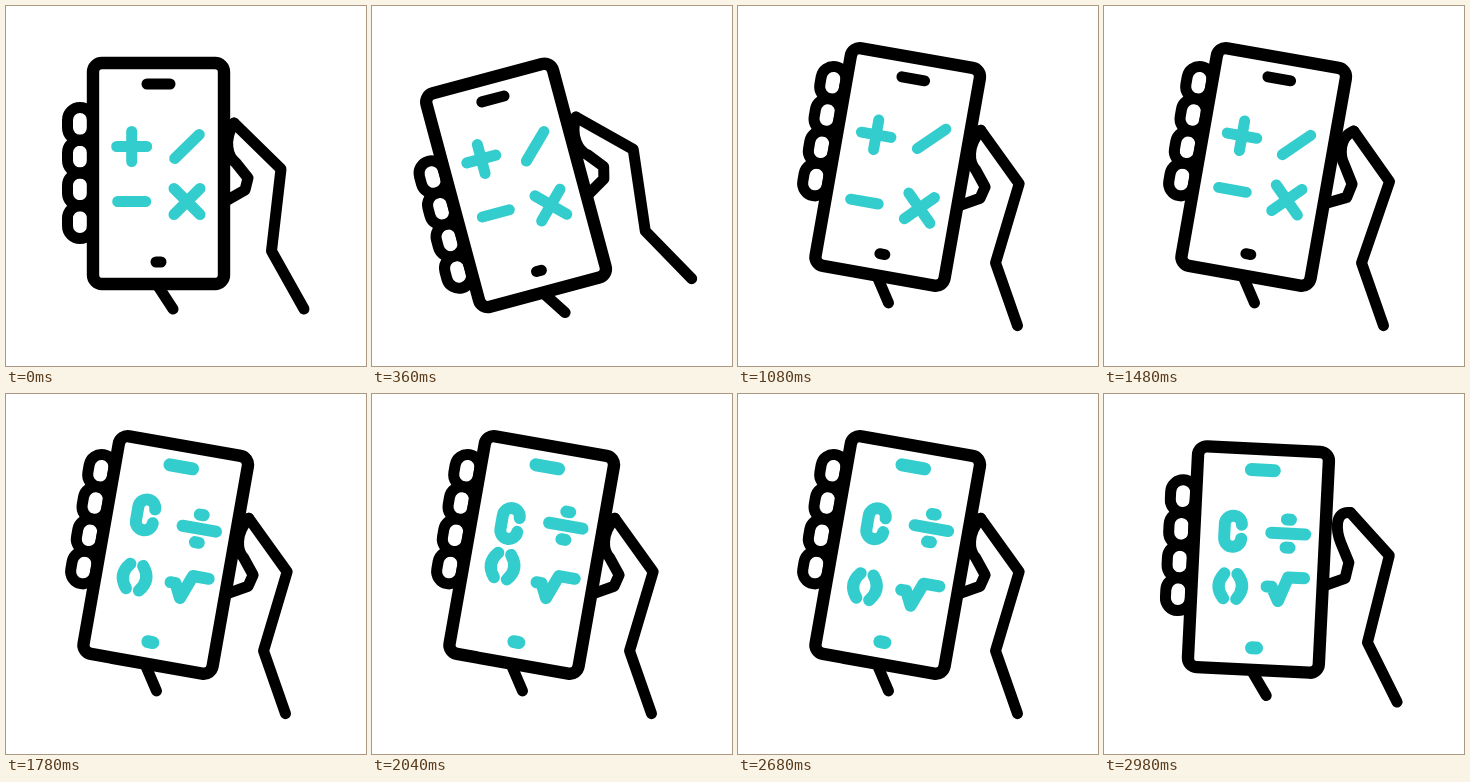
Animation of 360 by 360 pixels, one loop 3 s. Source, as an HTML page:

```html
<!DOCTYPE html>
<html lang="en">
<head>
<meta charset="utf-8">
<title>Phone calculator</title>
<style>
  html, body { margin: 0; width: 100%; height: 100%; overflow: hidden; background: #fff; }
  svg { display: block; width: 100vw; height: 100vh; }
  g { fill: none; stroke: #000; stroke-width: 11; stroke-linecap: round; stroke-linejoin: round; }
  .teal { stroke: #34cdcd; }
  #keys.teal { stroke-width: 13; }
  #functions { stroke-width: 12; }
</style>
</head>
<body>
<svg viewBox="0 0 360 360">
  <g id="scene">
    <path id="hand"/>
    <path id="thumb"/>
    <path d="M150 277L167 303"/>
    <g id="fingers"></g>
    <rect x="87" y="57" width="131" height="221" rx="9" fill="#fff" stroke-width="12.4"/>
    <path id="keys" d="M141 78H164M150 256H155"/>
    <g id="operators" class="teal">
      <path d="M-15 0H15M0-15V15"/>
      <path d="M-12.3 12L12.3-12"/>
      <path d="M-14 0H14"/>
      <path d="M-13-13L13 13M13-13L-13 13"/>
    </g>
    <g id="functions" class="teal">
      <path d="M8.5-7A8.5 8.5 0 0 0-8.5-7V7A8.5 8.5 0 0 0 8.5 7"/>
      <path d="M-17 0H17M-2-14H2M-2 14H2"/>
      <path d="M-6.5-12.5Q-17 0-6.5 12.5M6.5-12.5Q17 0 6.5 12.5"/>
      <path d="M-19-2H-14L-7 12L2-12H18"/>
    </g>
  </g>
</svg>
<script>
const $ = id => document.getElementById(id);
const LOOP = 3000, HALF = 1500;

const clamp = p => Math.min(1, Math.max(0, p));

function ease(t, from, to) {
  const p = clamp((t - from) / (to - from));
  return p * p * (3 - 2 * p);
}

// A sine of the given number of cycles, flat outside from..to
const wave = (u, from, to, cycles) =>
  Math.sin(2 * Math.PI * cycles * clamp((u - from) / (to - from)));

// Vertical motion of the four icon slots
const bobs = [
  u => -9 * wave(u, 0, 0.76, 1) ** 2,
  u => -8.5 * wave(u, 0, 1, 0.5),
  u => -12 * wave(u, 0.18, 0.88, 1),
  u => 9 * wave(u, 0.36, 1, 0.5)
];

for (let i = 0; i < 4; i++)
  $('fingers').innerHTML += `<rect x="61.5" y="${101.5 + i * 32.75}" width="25" height="32.75" rx="12.5"/>`;

function drawHand(lift) {
  // Interpolated point: resting place plus the shift when lifted
  const at = (x, y, dx, dy) => `${x + dx * lift} ${y + dy * lift} `;
  const tip = 'M' + at(228, 117, 14, -1);
  $('hand').setAttribute('d', tip + 'L' + at(275, 163, 8, -6) + 'L265.5 245L298 303');
  $('thumb').setAttribute('d', tip +
    'C' + at(217, 135, 8, -20) + at(222, 151, 7, -15) + at(230, 157, 4, -10) +
    'L' + at(242, 172, 1, -6) + 'L' + at(239, 184, 1, -2) + 'L' + at(218, 196, 0, -5));
}

function drawIcons(t) {
  const second = t >= HALF;
  $('keys').setAttribute('class', second ? 'teal' : '');
  $('operators').style.display = second ? 'none' : '';
  $('functions').style.display = second ? '' : 'none';
  for (const icon of [$('operators'), $('functions')])
    bobs.forEach((bob, i) => {
      const x = 125.7 + 55.3 * (i % 2);
      const y = 140.5 + 55 * (i >> 1) + bob(t % HALF / HALF);
      icon.children[i].setAttribute('transform', `translate(${x} ${y})`);
    });
}

function draw(t) {
  // Tilt left, swing right, then start swinging back; fingers slide the other way
  const left = ease(t, 0, 300);
  const right = ease(t, 780, 1080) - ease(t, 2875, 3175);
  $('scene').setAttribute('transform', `rotate(${25 * right - 15 * left} 193.5 205.5)`);
  $('fingers').setAttribute('transform', `translate(0 ${20 * left - 42 * right})`);

  drawHand(ease(t, 1120, 1360) - ease(t, 1360, 1600) + ease(t, 2720, 2960));
  drawIcons(t);
}

const start = performance.now();
function frame() {
  draw((performance.now() - start) % LOOP);
  requestAnimationFrame(frame);
}
frame();
</script>
</body>
</html>
```
